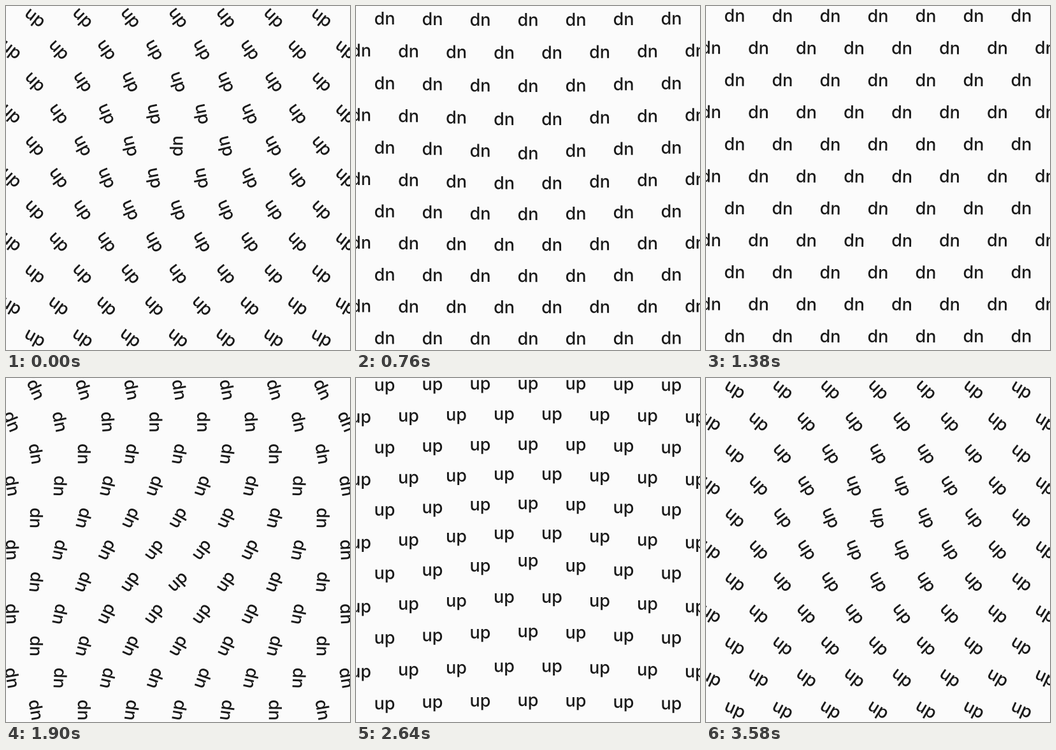
An HTML page with a canvas for the animation above (3600 ms loop, 540x540 px).

```html
<!DOCTYPE html>
<html>
<head>
<meta charset="utf-8">
<style>
  html, body { margin: 0; height: 100%; overflow: hidden; background: #fbfbfb; }
  canvas { display: block; }
</style>
</head>
<body>
<canvas id="stage" width="540" height="540"></canvas>
<script>
const ctx = document.getElementById('stage').getContext('2d');
const LOOP = 3600;
const COL = 75, ROW = 50.25;    // grid pitch
const DELAY = 0.4;              // ms per pixel from the lead word
const SPIN = 0.011, SLIDE = 0.0132;

const sigmoid = (ms, rate) => 1 / (1 + Math.exp(-ms * rate));

function drawWord(x, y, ms) {
  const u = (ms + LOOP) % LOOP;
  const halfTurns = sigmoid(u, SPIN) + sigmoid(u - 1800, SPIN) + sigmoid(u - 3600, SPIN);
  const drop = sigmoid(u - 900, SLIDE) - sigmoid(u - 2700, SLIDE);
  ctx.save();
  ctx.translate(x, y + 2 * ROW * drop);
  ctx.rotate(Math.PI * halfTurns);
  ctx.fillText('up', 0, 7.5);
  ctx.restore();
}

function draw(time) {
  ctx.fillStyle = '#fbfbfb';
  ctx.fillRect(0, 0, 540, 540);
  ctx.fillStyle = '#1a1a1a';
  ctx.font = '500 27px Inter, "Liberation Sans", sans-serif';
  ctx.textAlign = 'center';
  // Rows and columns are counted from the word that leads the wave
  for (let row = -7; row <= 7; row++) {
    for (let col = -4; col <= 4; col++) {
      const dx = (col + (row & 1) / 2) * COL, dy = row * ROW;
      drawWord(270 + dx, 270 - ROW + dy, time % LOOP - DELAY * Math.hypot(dx, dy));
    }
  }
}

const start = performance.now();
function tick() {
  draw(performance.now() - start);
  requestAnimationFrame(tick);
}
tick();
</script>
</body>
</html>
```
